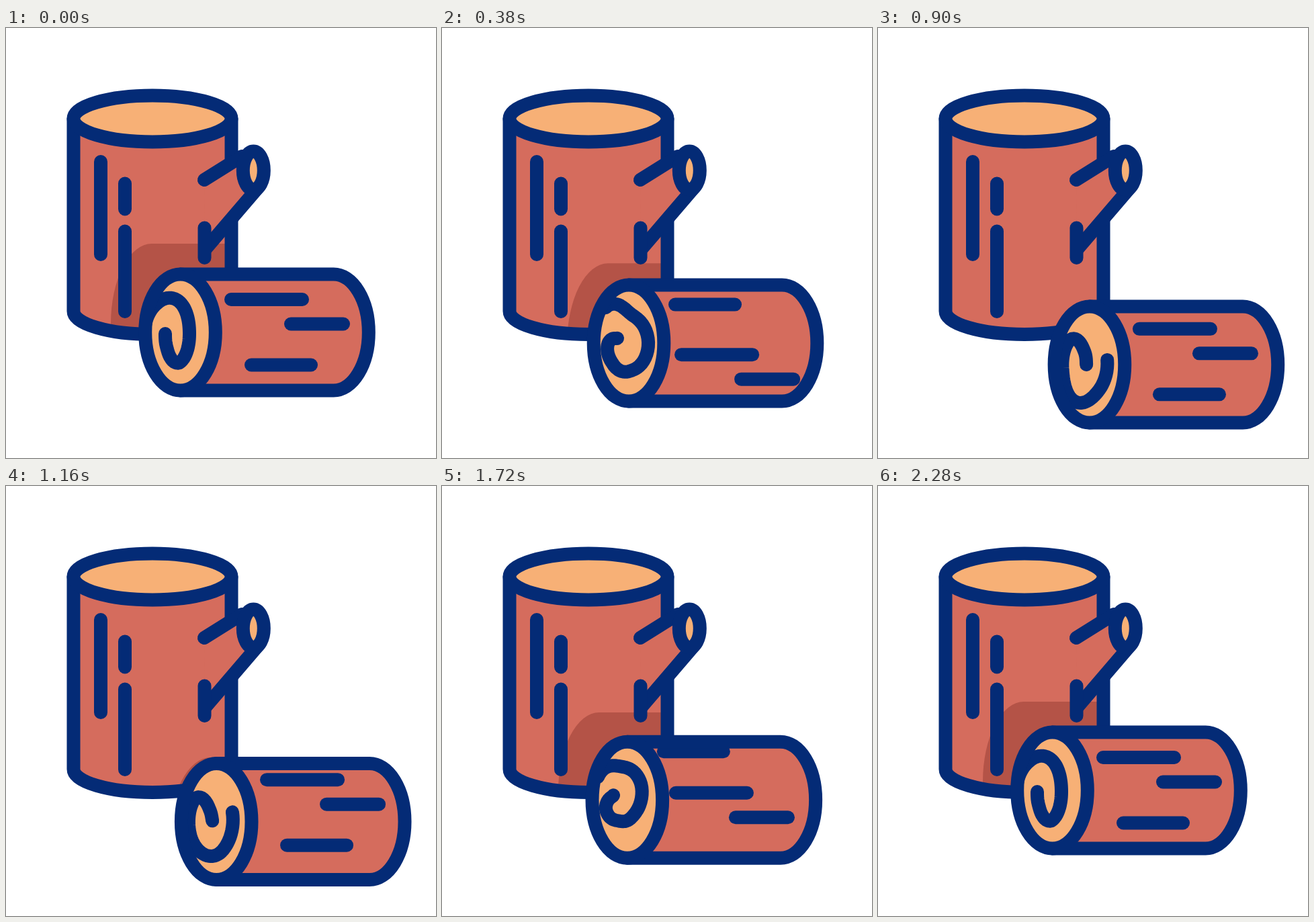
An HTML page with a canvas for the animation above (3 s loop, 640 px wide and 640 px high).

```html
<!DOCTYPE html>
<html lang="en">
<head>
<meta charset="utf-8">
<title>Rolling log</title>
<style>
  html, body { margin: 0; height: 100%; overflow: hidden; background: #fff; }
  canvas { display: block; width: 100vw; height: 100vh; }
</style>
</head>
<body>
<canvas width="640" height="640"></canvas>
<script>
const ctx = document.querySelector('canvas').getContext('2d');
const NAVY = '#042b76', BARK = '#d56c5d', SHADE = '#b45347', WOOD = '#f7b076';
const LOOP = 3000, OUT = 1000, HIT = 2000, REST = 2280;
const FACE = { x: 259.5, y: 453, rx: 52.3, ry: 86.5, length: 228 };

// time, grain x y, following grain x y, spiral turn, shadow x y
const MOTION = [
  [0, 0, 0, -54, -157, 180, 0, 0],
  [OUT, 65, 253, 57, 49.5, 357, 93, 90],
  [1400, 33, 143, 32, -20, 303, 66, 59],
  [1720, 13, 53, -35, -106, 216, 17, 16],
  [HIT, -9, -15, -70, -165, 168, 0, -3],
  [REST, 0, 0, -54, -157, 180, 0, 0]
];
// time, then the spiral radius at every 60 degrees from the inner end
const COIL = [15, 23, 48, 45, 51, 56, 67];
const COILS = [
  [0, ...COIL],
  [380, 11, 30, 34, 47, 71, 53, 65],
  [OUT, ...COIL],
  [1400, 9, 19, 44, 48, 44, 56, 59],
  [1720, 15, 33, 29, 41, 62, 52, 62],
  [HIT, 11, 18, 53, 46, 48, 60, 62],
  [REST, ...COIL]
];
const GRAIN = [[335, 441, 404], [424, 502, 440.5], [365, 454, 501.5]];

const clamp = p => Math.max(0, Math.min(1, p));
const smooth = p => p * p * (3 - 2 * p);

function bezier(p, x1, y1, x2, y2) {
  const at = (u, a, b) => 3 * (1 - u) ** 2 * u * a + 3 * (1 - u) * u * u * b + u ** 3;
  let lo = 0, hi = 1;
  for (let i = 0; i < 24; i++) {
    const mid = (lo + hi) / 2;
    if (at(mid, x1, x2) < p) lo = mid; else hi = mid;
  }
  return at(lo, y1, y2);
}

// Smooth curve through one column of a key table, flat at turning points
function track(rows, t, col) {
  const last = rows.length - 1;
  if (t >= rows[last][0]) return rows[last][col];
  const i = rows.findIndex(row => row[0] > t) - 1;
  const slope = k => {
    if (k === 0 || k === last) return 0;
    const [a, b, c] = [rows[k - 1], rows[k], rows[k + 1]];
    return (b[col] - a[col]) * (c[col] - b[col]) <= 0 ? 0 : (c[col] - a[col]) / (c[0] - a[0]);
  };
  const a = rows[i], b = rows[i + 1], span = b[0] - a[0], p = (t - a[0]) / span;
  return a[col] + (b[col] - a[col]) * smooth(p)
    + span * p * (1 - p) * (slope(i) * (1 - p) - slope(i + 1) * p);
}

function paint(path, fill, outline = true) {
  if (fill) { ctx.fillStyle = fill; ctx.fill(path); }
  if (outline) ctx.stroke(path);
}

function ellipse(x, y, rx, ry) {
  const path = new Path2D();
  path.ellipse(x, y, rx, ry, 0, 0, 2 * Math.PI);
  return path;
}

const line = (x1, y1, x2, y2) => ctx.stroke(new Path2D(`M${x1} ${y1}L${x2} ${y2}`));

function clipped(path, draw) {
  ctx.save();
  ctx.clip(path);
  draw();
  ctx.restore();
}

const trunk = new Path2D('M100.5 135V421.5A117.5 34.5 0 0 0 335.5 421.5V135Z');
const trunkTop = ellipse(218, 135, 117.5, 34.5);
const branch = new Path2D('M295 226L351 191L374 238L296 330Z');
const branchTip = ellipse(368.3, 212, 15.5, 28.5);
const face = ellipse(FACE.x, FACE.y, FACE.rx, FACE.ry);
const logBody = new Path2D(`M${FACE.x} 366.5h${FACE.length}
  a${FACE.rx} ${FACE.ry} 0 0 1 0 173h${-FACE.length}Z`);
const shadow = new Path2D('M156 440A61 119 0 0 1 217 321H500V700H156Z');

function drawStump(t) {
  const p = clamp((t - HIT) / (REST - HIT));
  ctx.save();
  ctx.translate(0, -10 * smooth(1 - Math.abs(2 * p - 1)));
  paint(trunk, BARK, false);
  clipped(trunk, () => {
    ctx.translate(track(MOTION, t, 6), track(MOTION, t, 7));
    paint(shadow, SHADE, false);
  });
  paint(trunk);
  paint(trunkTop, WOOD);
  paint(branch, BARK, false);
  line(295, 226, 351, 191);
  line(374, 239, 296, 330);
  paint(branchTip, WOOD);
  line(141, 199, 141, 337);
  line(177, 231.5, 177, 269.5);
  line(177, 302.5, 177, 422);
  line(295.5, 297.5, 295.5, 342);
  ctx.restore();
}

function drawSpiral(t) {
  const turn = track(MOTION, t, 5);
  const radii = COIL.map((_, i) => [i * 60, track(COILS, t, i + 1)]);
  const path = new Path2D();
  for (let a = 0; a <= 360; a += 5) {
    const r = track(radii, a, 1), angle = (turn - a) * Math.PI / 180;
    path.lineTo(FACE.x - 13.5 + 0.6 * r * Math.cos(angle), FACE.y + 2 + r * Math.sin(angle));
  }
  ctx.stroke(path);
}

function logOffset(t) {
  if (t < OUT) return 57 * smooth(t / OUT);
  if (t < HIT) return 57 - 63.5 * bezier((t - OUT) / (HIT - OUT), 0.333, 0, 0.833, 0.833);
  return -6.5 * (1 - bezier(clamp((t - HIT) / (REST - HIT)), 0.167, 0.167, 0.667, 1));
}

function drawLog(t) {
  const dx = logOffset(t), dy = dx * 0.867;
  ctx.save();
  ctx.translate(dx, dy);
  paint(logBody, BARK, false);
  clipped(logBody, () => {
    ctx.translate(-dx, -dy);
    for (const col of [1, 3]) {
      const x = track(MOTION, t, col), y = track(MOTION, t, col + 1);
      for (const [x1, x2, gy] of GRAIN) line(x1 + x, gy + y, x2 + x, gy + y);
    }
  });
  paint(logBody);
  paint(face, WOOD, false);
  clipped(face, () => drawSpiral(t));
  paint(face);
  ctx.restore();
}

function frame(now) {
  const t = now % LOOP;
  ctx.fillStyle = '#fff';
  ctx.fillRect(0, 0, 640, 640);
  ctx.strokeStyle = NAVY;
  ctx.lineWidth = 20;
  ctx.lineCap = ctx.lineJoin = 'round';
  drawStump(t);
  drawLog(t);
  requestAnimationFrame(() => frame(performance.now()));
}
frame(0);
</script>
</body>
</html>
```
